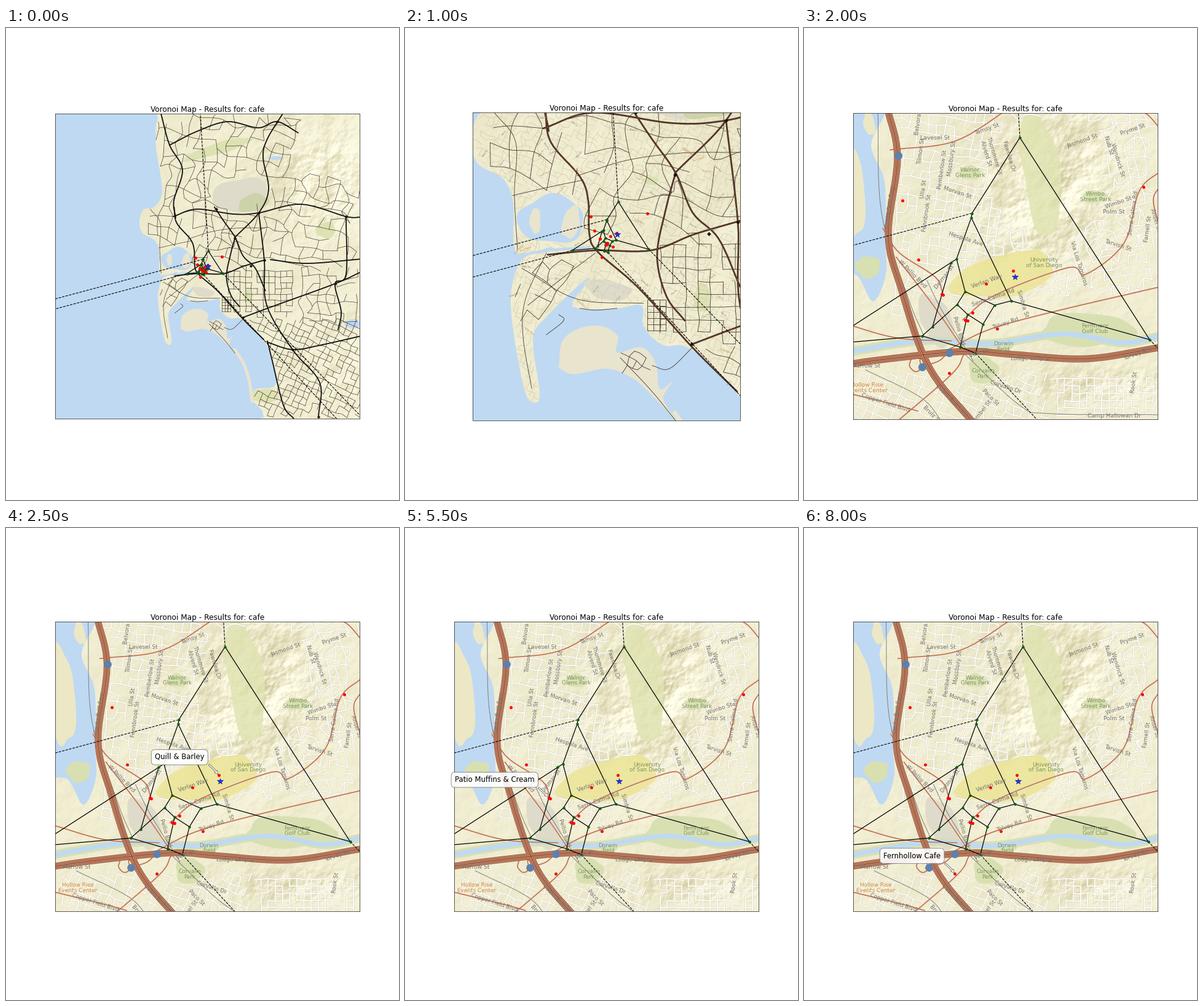
Animation, 639 px wide and 766 px high, one loop 8500 ms. Source, as a matplotlib script:

```python
import numpy as np
import matplotlib.pyplot as plt
from matplotlib.animation import FuncAnimation
from matplotlib.collections import LineCollection
from matplotlib.path import Path

W, H, DPI = 639, 766, 100
PX = 72 / DPI
CENTRE = np.array([327.5, 386.8])
MAX_W, MAX_H = 495.2, 499.4
STAR = np.array([343.0, 404.0])

# scale and star position of the sheets on which features are laid out
FAR = (0.11, 328.1, 386.6)
MID = (0.235, 345, 335.2)
NEAR = (1, 343, 404)

# visible width and height, and offset of the view's centre from the star
VIEWS = [(4502, 4502, -5, 2), (3176, 3372, -40, 111), (1853, 2125, -74, 220),
         (1180, 1186, -45, 101), (495.2, 497, -15.5, -17),
         (513.5, 486.9, -21.7, -24.7)]

WATER, SAND, PARK, GREY = "#bfd9f2", "#e8e4ce", "#d8e0b2", "#dedbca"
BROWN, PEACH = "#8f4a33", "#dca483"

CAFES = [
    ("Quill & Barley", 340, 394), ("Hazelmoor Cafe", 314, 488),
    ("El Zorral", 296, 415), ("Amber Thistle Cafe", 186, 376),
    ("Copper Wren Cafe", 274, 462), ("Nimbo Cafe", 160, 280),
    ("Patio Muffins & Cream", 224, 432), ("Mapleknot Bakery", 226, 433.5),
    ("Dovetree Deli", 262, 474), ("Tawnel Cafe", 266, 475),
    ("Lantern & Rye", 552, 258), ("Fernhollow Cafe", 236, 560),
]
NODES = dict(A=(351, 178), B=(273, 301), C=(272, 308), D=(248, 375),
             E=(239, 381), F=(262, 428), G=(249, 449), H=(266, 465),
             I=(291, 481), J=(310, 450), K=(337, 443), L=(562, 506),
             M=(209, 485), N=(192, 500), O=(254, 518), P=(279, 528),
             Q=(32, 514))
EDGES = ("AB AL BC CD CK DE DF EM EQ FG FJ GM GH HI HO IJ JK KL "
         "MN NO NQ OP PI").split()
RAYS = dict(A=(-0.058, -1), B=(-1, 0.268), Q=(-1, 0.268),
            L=(1, 1.033), P=(1, 1.08))

# street names grouped by their slant in degrees
STREETS = {
    82: [("Belvora St", 187, 150), ("Tilmon St", 191, 200), ("Ulla St", 195, 262),
         ("Fennbrook St", 200, 300), ("Pemberlow St", 225, 230),
         ("Mossbury St", 241, 212), ("Costa Brill Fwy", 140, 290),
         ("Serra Calma Rd", 536, 301), ("Farnell St", 560, 326),
         ("Rook St", 537, 575)],
    -73: [("Thornmere St", 309, 207), ("Alverd St", 296, 204),
          ("Fawnlea Dr", 333, 208), ("Nub St", 495, 191),
          ("Wendrick St", 510, 214), ("Ansel St", 571, 312),
          ("Via Los Tamaros", 446, 382), ("Simbra St", 355, 447),
          ("Pellio Blvd", 251, 491)],
    19: [("Tamsy St", 297, 164), ("Jasmond St", 453, 183), ("Pryme St", 535, 165),
         ("Wimbo St", 512, 283), ("Verlan Way", 297, 411),
         ("Serra Calma Rd", 308, 438), ("Tolvey Rd", 328, 480),
         ("Velo St", 285, 528), ("Torvey Rd", 541, 529)],
    0: [("Lavesel St", 213, 179), ("Polm St", 504, 299), ("Lodge Loop S", 368, 537),
        ("Marrow St", 101, 549), ("Camp Hallowan Dr", 505, 630)],
    -18: [("Morvan St", 249, 267), ("Hespola Ave", 263, 343),
          ("Tarvish St", 510, 353), ("Corvallo Dr", 328, 583),
          ("Copper Field Blvd", 132, 609)],
    -45: [("W Pellio Blvd", 176, 400), ("Paco St", 303, 600),
          ("Brulz St", 208, 627), ("Costa Brill Fwy", 240, 604)],
    52: [("Delmar St", 228, 404), ("Sombel St", 289, 624)],
}
PLACES = [("Walnor\nGlens Park", 270, 235), ("Wimbo\nStreet Park", 474, 274),
          ("University\nof San Diego", 390, 381), ("Fernmoor\nGolf Club", 473, 488),
          ("Dorwin\nField", 324, 517), ("Corvallo\nPark", 291, 561)]
TINY = ["Alder St", "Bay Ln", "Cedar Rd", "Elm Park", "North Mesa", "Hill Ct"]

rng = np.random.default_rng(7)


# ---- geometry -----------------------------------------------------------

def world(view, pts):
    s, x, y = view
    return STAR + (np.reshape(pts, (-1, 2)) - (x, y)) / s


def smooth(p, n=8):
    """Catmull-Rom curve through the points."""
    q = np.vstack([2 * p[0] - p[1], p, 2 * p[-1] - p[-2]])
    t = np.linspace(0, 1, n, endpoint=False)[:, None]
    parts = [0.5 * (2 * b + (c - a) * t + (2 * a - 5 * b + 4 * c - d) * t ** 2
                    + (3 * b - a - 3 * c + d) * t ** 3)
             for a, b, c, d in zip(q, q[1:], q[2:], q[3:])]
    return np.vstack(parts + [p[-1:]])


def curve(view, *xy):
    return smooth(world(view, xy))


def turn(deg):
    c, s = np.cos(np.radians(deg)), np.sin(np.radians(deg))
    return np.array([[c, s], [-s, c]])


def blob(view, cx, cy, rx, ry, deg=0):
    """Ellipse with a gently wavy edge."""
    t = np.linspace(0, 2 * np.pi, 60)
    r = 1 + 0.07 * np.sin(3 * t + cx) + 0.05 * np.sin(5 * t + cy)
    return world(view, np.c_[rx * r * np.cos(t), ry * r * np.sin(t)] @ turn(deg)
                 + (cx, cy))


def outside(*shapes):
    paths = [Path(s) for s in shapes]
    return lambda p: ~np.any([q.contains_points(p) for q in paths], axis=0)


def network(view, box, step, ok, deg=0, keep=0.8, jitter=0.1):
    """Streets on a jittered lattice, broken at random and where not ok."""
    lo, hi = np.reshape(box, (2, 2))
    n = int(np.hypot(*(hi - lo)) / step) + 1
    g = (np.arange(n) - n / 2) * step
    p = np.stack(np.meshgrid(g, g), -1) + rng.normal(0, jitter * step, (n, n, 2))
    p = p @ turn(deg) + (lo + hi) / 2
    inside = ((p > lo) & (p < hi)).all(-1)
    p = world(view, p)
    good = inside & ok(p).reshape(n, n)
    p = p.reshape(n, n, 2)
    roads = []
    for pts, flags in [*zip(p, good), *zip(p.swapaxes(0, 1), good.T)]:
        run = []
        for q, free in [*zip(pts, flags), (None, False)]:
            if free:
                run.append(q)
            if not free or rng.random() > keep:
                if len(run) > 1:
                    roads.append(smooth(np.array(run), 4))
                run = []
    return roads


def terrain(seed, hills, n=360):
    """Hill-shaded land; each hill is (u, v, width, height, strength)."""
    noise = np.random.default_rng(seed).normal(size=(n, n))
    f = np.fft.fftfreq(n)
    k = np.hypot(*np.meshgrid(f, f))
    k[0, 0] = 1
    dy, dx = np.gradient(np.fft.ifft2(np.fft.fft2(noise) / k ** 1.8).real)
    u, v = np.meshgrid(np.linspace(0, 1, n), np.linspace(0, 1, n))
    mask = 0.2 + sum(g * np.exp(-((u - a) / w) ** 2 - ((v - b) / h) ** 2)
                     for a, b, w, h, g in hills)
    shade = np.clip((dx + dy) / (dx + dy).std(), -2.2, 1.2) * mask
    rgb = np.array([241, 237, 209]) + shade[..., None] * np.array([12, 13, 19])
    return np.clip(rgb, 0, 255).astype(np.uint8)


# ---- regional map -------------------------------------------------------

far_land = terrain(3, [(0.9, 0.2, 0.2, 0.18, 1), (0.95, 0.85, 0.15, 0.2, 0.5)])
coast = smooth(np.vstack([
    world(FAR, [70, 130, 231, 130, 243, 165, 244, 195, 254, 265, 240, 291,
                224, 294, 217, 313]),
    world(MID, [118, 220, 160, 245, 176, 285, 181, 366, 234, 356, 234, 363,
                192, 374, 173, 425, 176, 490, 195, 590, 212, 608, 219, 590,
                208, 503, 232, 467, 290, 411, 298, 412, 272, 452, 340, 456,
                385, 450, 388, 485, 420, 515, 465, 521, 545, 600]),
    world(FAR, [438, 560, 436, 582, 408, 586, 398, 600, 396, 640, 70, 640])]), 4)
bay = blob(MID, 238, 311, 54, 39)
island = curve(MID, 250, 552, 256, 508, 285, 487, 320, 484, 346, 500, 345, 527,
               385, 518, 408, 545, 414, 586, 434, 575, 420, 602, 442, 638,
               412, 607, 375, 572, 330, 553, 275, 562, 250, 552)
strand = curve(FAR, 372, 522, 387, 546, 396, 575, 400, 606)
islets = [blob(MID, 212, 313, 9, 21), blob(MID, 270, 316, 14, 27, 12)]
base = blob(FAR, 380, 270, 45, 26, -12)
hills = blob(FAR, 535, 190, 72, 52)

freeways = [
    curve(FAR, 252, 139, 266, 190, 287, 230, 273, 280, 276, 308),
    curve(MID, 228, 130, 237, 185, 285, 242, 298, 280, 300, 335, 314, 364,
          380, 422, 467, 518, 540, 590),
    curve(FAR, 425, 508, 433, 540, 451, 612, 468, 634),
    curve(FAR, 450, 139, 425, 180, 418, 210, 427, 262, 411, 300, 372, 340),
    curve(MID, 368, 130, 400, 178, 440, 235, 468, 300, 510, 342, 545, 420),
    curve(MID, 440, 235, 424, 295, 410, 370, 425, 435, 455, 475),
    curve(FAR, 411, 300, 420, 377, 424, 450, 466, 522, 510, 575, 508, 632),
    curve(MID, 232, 368, 310, 361, 400, 361, 470, 335, 545, 313),
    curve(FAR, 430, 376, 490, 382, 577, 375),
    curve(FAR, 272, 306, 310, 294, 370, 302, 411, 300, 480, 286, 553, 306, 577, 307),
    curve(FAR, 553, 306, 553, 400, 535, 415, 545, 460, 540, 490),
    curve(FAR, 385, 470, 425, 455, 535, 415, 577, 396),
    curve(FAR, 425, 510, 466, 522, 510, 515, 577, 500),
    curve(FAR, 266, 190, 310, 168, 360, 152, 410, 162, 441, 152, 475, 170),
]
hubs = world(FAR, [441, 152, 342, 294, 411, 300, 372, 341, 398, 386, 420, 377,
                   553, 306, 535, 415, 385, 470, 466, 522, 508, 631])

dry = outside(coast, bay)
quiet = outside(coast, bay, base, hills)
avenues = [
    curve(MID, 145, 137, 180, 185, 178, 270, 183, 360),
    curve(MID, 175, 272, 240, 257, 290, 247),
    curve(MID, 280, 240, 360, 215, 450, 203, 545, 202),
    curve(MID, 230, 365, 196, 440, 192, 500, 206, 585),
    curve(MID, 310, 365, 270, 395, 200, 450),
    curve(MID, 190, 390, 280, 440, 388, 447),
    curve(MID, 230, 498, 258, 475, 250, 465),
    curve(MID, 284, 455, 310, 458, 345, 455),
    curve(MID, 402, 548, 430, 553, 468, 518),
    curve(MID, 350, 535, 400, 588, 440, 637),
]
avenues += network(FAR, (220, 140, 577, 395), 17, quiet, 12, 0.74, 0.22)
avenues += network(FAR, (470, 385, 577, 480), 15, dry, 0, 0.72, 0.2)
avenues += network(FAR, (357, 385, 470, 470), 9.5, dry, 0, 0.8, 0.05)
avenues += network(FAR, (395, 470, 577, 634), 10, dry, 24, 0.8, 0.08)
avenues += network(FAR, (248, 403, 300, 460), 12, dry, 35, 0.7)
avenues += network(MID, (388, 440, 430, 492), 10, dry, 0, 0.95, 0)
avenues += network(MID, (350, 520, 402, 562), 13, lambda p: p[:, 0] == p[:, 0], 28)
lanes = network(MID, (100, 130, 550, 640), 9, dry, 24, 0.6, 0.2)
specks = [(p, rng.uniform(-60, 60), rng.choice(TINY))
          for p in world(MID, rng.uniform((112, 140), (540, 630), (130, 2)))
          if dry([p])[0]]

# ---- city map -----------------------------------------------------------

near_land = terrain(11, [(0.6, 0.3, 0.2, 0.25, 0.9), (0.8, 0.88, 0.25, 0.06, 0.9),
                         (0.75, 0.15, 0.15, 0.25, 0.5)])
lagoon = curve(NEAR, 40, 128, 130, 128, 109, 190, 131, 250, 132, 345, 133, 400,
               112, 444, 84, 400, 40, 405)
shoals = [blob(NEAR, 76, 262, 22, 84, -4), blob(NEAR, 106, 155, 9, 20, -10)]
canyon = blob(NEAR, 385, 235, 30, 105, -8)
slopes = blob(NEAR, 400, 245, 90, 105)
campus = blob(NEAR, 325, 402, 86, 34, -12)
yard = blob(NEAR, 215, 475, 24, 45, -25)
parks = [blob(NEAR, 460, 490, 76, 27), blob(NEAR, 291, 555, 24, 22),
         blob(NEAR, 270, 235, 17, 11), blob(NEAR, 473, 274, 20, 10),
         blob(NEAR, 324, 517, 16, 9)]
river = curve(NEAR, 50, 530, 195, 507, 300, 513, 400, 498, 450, 499, 520, 511,
              584, 499)
highways = [
    curve(NEAR, 135, 128, 152, 210, 137, 335, 157, 420, 203, 550, 276, 642),
    curve(NEAR, 60, 548, 130, 538, 260, 525, 340, 530, 460, 537, 582, 518),
]
arterials = [
    curve(NEAR, 258, 474, 310, 434, 430, 389, 458, 400, 520, 350, 545, 265, 580, 232),
    curve(NEAR, 235, 522, 300, 490, 400, 462, 580, 420),
    curve(NEAR, 128, 325, 155, 365, 213, 404, 226, 432),
    curve(NEAR, 150, 372, 210, 450, 262, 525),
    curve(NEAR, 140, 198, 245, 184, 335, 130),
    curve(NEAR, 60, 478, 150, 503, 240, 508),
    curve(NEAR, 260, 530, 240, 562, 150, 640),
    curve(NEAR, 60, 590, 150, 612, 185, 622),
    curve(NEAR, 540, 130, 560, 142, 580, 165),
    curve(NEAR, 580, 255, 568, 280, 580, 330),
    blob(NEAR, 184, 546, 13, 11), blob(NEAR, 208, 536, 22, 9, -20),
]
rails = [
    curve(NEAR, 120, 130, 126, 300, 170, 440, 195, 500),
    curve(NEAR, 100, 555, 190, 600, 225, 640),
    curve(NEAR, 262, 530, 350, 612, 400, 626, 580, 628),
    curve(NEAR, 200, 410, 225, 460, 275, 540),
]
free = outside(lagoon, slopes, campus, yard, *parks)
streets = network(NEAR, (138, 130, 330, 478), 15, free, 8, 0.75, 0.1)
streets += network(NEAR, (330, 130, 580, 440), 15, free, -12, 0.68, 0.25)
streets += network(NEAR, (60, 555, 400, 640), 14, free, 22, 0.72, 0.1)
streets += network(NEAR, (400, 558, 580, 640), 12, free, 0, 0.85, 0.05)

# ---- drawing ------------------------------------------------------------

fig = plt.figure(figsize=(W / DPI, H / DPI), dpi=DPI, facecolor="white")
ax = fig.add_axes([0, 0, 1, 1])
title = fig.text(CENTRE[0] / W, 0, "Voronoi Map - Results for: cafe",
                 ha="center", va="baseline", fontsize=12.15 * PX,
                 family="DejaVu Sans")


def fill(color, *shapes, **kw):
    for p in shapes:
        ax.fill(*p.T, color=color, lw=0, **kw)


def lines(paths, color, width):
    ax.add_collection(LineCollection(paths, colors=color, linewidths=width * PX,
                                     capstyle="round"))


def label(text, x, y, size, color, deg=0):
    ax.text(x, y, text, fontsize=size * PX, color=color, rotation=deg,
            ha="center", va="center", clip_on=True, linespacing=0.95,
            family="DejaVu Sans")


def dots(pts, marker, color, size, **kw):
    ax.plot(*np.transpose(pts), marker, color=color, ms=size * PX,
            **{"mew": 0, **kw})


def land_image(img, x0, y0, x1, y1):
    ax.imshow(img, extent=(x0, x1, y1, y0), aspect="auto",
              interpolation="bilinear")


def draw_region(s):
    zoomed = s > 0.2
    land_image(far_land, *world(FAR, [80, 139, 577, 636]).ravel())
    fill(GREY, base)
    fill("#cdd3a9", blob(FAR, 402, 284, 25, 14, -15))
    fill("#dde2b2", blob(FAR, 345, 196, 58, 9, -17), blob(FAR, 520, 328, 16, 13),
         blob(FAR, 420, 597, 24, 11), blob(MID, 483, 438, 13, 24),
         blob(MID, 400, 248, 13, 7))
    fill(WATER, coast, bay, blob(FAR, 564, 480, 13, 7), blob(FAR, 438, 211, 11, 3))
    fill(SAND, island, *islets)
    lines([strand], SAND, 3 + 18 * s)
    fill(GREY, blob(MID, 330, 425, 38, 16, 12))
    lines([curve(MID, 186, 369, 235, 361, 300, 356)], WATER, 18 * s)
    if zoomed:
        lines(lanes, "#d3ceb6", 0.8)
    lines(avenues, "#3a2d26", 0.5 + 1.2 * s)
    wide = 1.1 + 6.5 * s
    lines(freeways, "#2f1a12" if zoomed else "#111111", wide)
    if zoomed:
        lines(freeways, "#9a5f47", wide * 0.25)
        for p, deg, text in specks:
            color = {"k": "#7f9a66", "a": "#d08a45"}.get(text[-1], "#77776c")
            label(text, *p, 3.2, color, deg)
    dots(hubs, "D", "#1c120d", 2.8 + 8 * s)


def draw_city(s):
    land_image(near_land, 58, 128, 584, 642)
    fill("#dfe3b0", canyon, alpha=0.8)
    fill("#ebe597", campus, alpha=0.85)
    fill(GREY, yard)
    fill(PARK, *parks)
    fill(WATER, lagoon)
    fill("#ece8c6", *shoals)
    fill(PARK, blob(NEAR, 104, 388, 20, 18))
    lines([river], PARK, 15 * s)
    lines([river], WATER, 8 * s)
    lines(streets, "#d6d2bf", 2.8 * s)
    lines(streets, "#fffefa", 1.8 * s)
    lines(rails, "#77776f", 0.9)
    lines(arterials, "#f3cdb0", 2.6 * s)
    lines(arterials, "#b0644a", 1.3 * s)
    for n, width in enumerate((11, 8.6, 6.4, 4, 1.8)):
        lines(highways, PEACH if n % 2 else BROWN, width * s)
    dots([(153, 207), (236, 527), (192, 550)], "o", "#5d80ad", 13 * s)
    for deg, names in STREETS.items():
        for name, x, y in names:
            label(name, x, y, 9.4 * s, "#77766f", deg)
    for name, x, y in PLACES:
        label(name, x, y, 9.2 * s, "#7f935f")
    label("Hollow Rise\nEvents Center", 103, 584, 9.2 * s, "#d08a45")


def draw_cells():
    lines([[NODES[a], NODES[b]] for a, b in EDGES], "black", 1.25)
    for key, step in RAYS.items():
        start = np.array(NODES[key])
        end = start + 4000 * np.array(step)
        ax.plot(*np.transpose([start, end]), "--", color="black", lw=1.1 * PX)
    dots(list(NODES.values()), "o", "#0b5a12", 4.4)
    dots([c[1:] for c in CAFES], "o", "red", 5)
    dots([STAR], "*", "#2a2aff", 10.5, mec="#15156e", mew=0.4)


def callout(name, x, y):
    ax.annotate(
        name, (x, y), xytext=(-23 * PX, 29 * PX), textcoords="offset points",
        ha="right", va="center", fontsize=11.6 * PX, family="DejaVu Sans",
        annotation_clip=False, zorder=10,
        bbox=dict(boxstyle="round,pad=0.5", fc="white", ec="#777777",
                  alpha=0.9, lw=0.9 * PX),
        arrowprops=dict(arrowstyle="simple", fc="white", ec="#666666",
                        lw=0.8 * PX, shrinkB=1,
                        connectionstyle="arc3,rad=-0.3"))


def draw(i):
    w, h, dx, dy = VIEWS[min(i, 5)]
    s = min(MAX_W / w, MAX_H / h)
    left, top = CENTRE - np.array([w, h]) * s / 2
    x, y = STAR + (dx, dy)
    ax.clear()
    ax.set_position([left / W, 1 - (top + h * s) / H, w * s / W, h * s / H])
    (draw_region if i < 4 else draw_city)(s)
    draw_cells()
    if i >= 5:
        callout(*CAFES[i - 5])
    ax.set(xlim=(x - w / 2, x + w / 2), ylim=(y + h / 2, y - h / 2),
           xticks=[], yticks=[])
    for spine in ax.spines.values():
        spine.set(color="#333333", linewidth=0.8 * PX)
    title.set_y(1 - (top - 3.3) / H)
    return []


anim = FuncAnimation(fig, draw, frames=17, interval=500, repeat=True,
                     init_func=lambda: [], blit=False)
plt.show()
```
